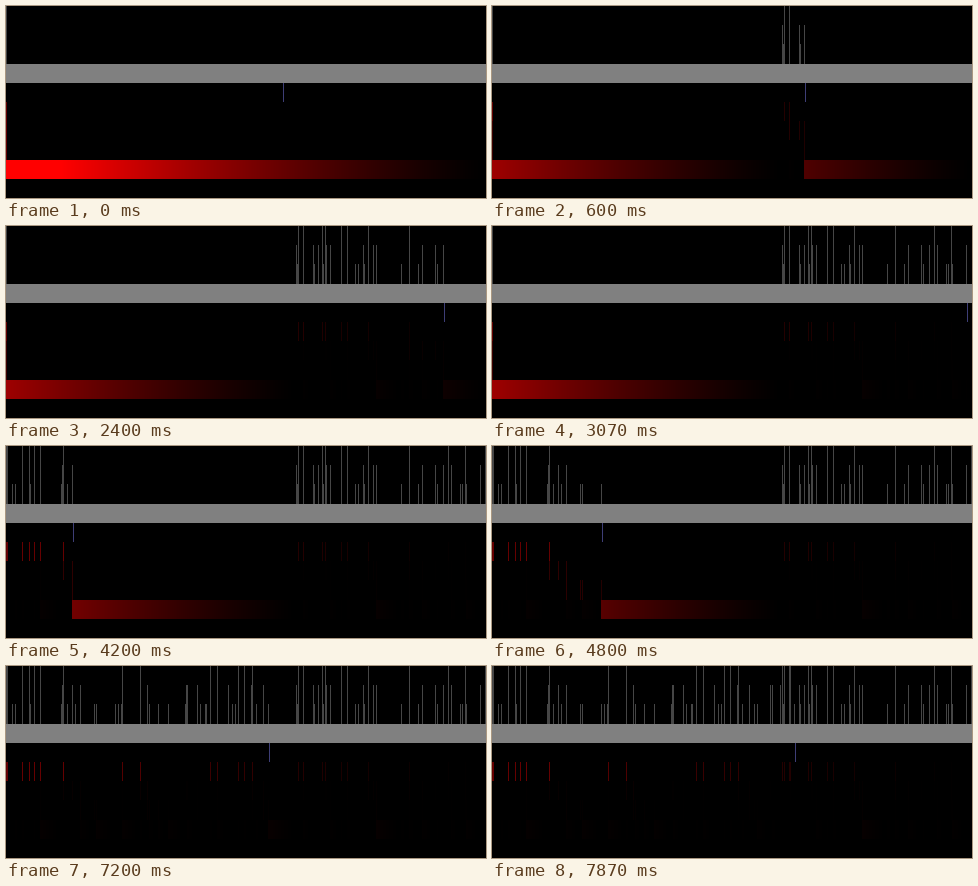
Recreate the animation shown at these times as a matplotlib script. Size 480 px wide and 192 px high, loop 8000 ms.

```python
import math
import random

import numpy as np
import matplotlib.pyplot as plt
from matplotlib.animation import FuncAnimation

W, H, DPI = 480, 192, 100
STEPS = 14
STEP_TICKS = 3          # three 200 ms ticks per cursor step
ROW = H / 10

GRAY, TICK, BLUE = (128,) * 3, (70,) * 3, (62, 62, 118)
FULL_REACH = 425        # distance that gives full red
LINE_DIM = 0.4          # single-column lines are dimmer than open spans

# Key tall nodes along the sweep; positions past W wrap around.
TALL = [292, 297, 316, 319, 335, 341, 362, 403, 442, 459, 479, 481,
        496, 503, 508, 514, 537, 596, 614, 684, 691, 712, 718, 726, 770, 778]


def cursor_at(step):
    """Steady sweep with a slight wobble, not yet wrapped."""
    wobble = 4 * math.cos(2 * math.pi * (step - 4) / 5.5)
    return round(277.5 + 39.1 * step + wobble)


def make_nodes():
    """Tall key nodes, plus short random ones leading up to each stop."""
    rng = random.Random(11)
    nodes = {0: 3}
    for step in range(1, STEPS):
        start, stop = cursor_at(step - 1), cursor_at(step)
        places = rng.sample(range(start + 2, stop - 2), 4) + [stop - 1]
        nodes.update((x, rng.choice((1, 2))) for x in places)
    nodes.update((x, 3) for x in TALL)
    return nodes


NODES = make_nodes()


def heights_at(cursor):
    """Node height in every column once the cursor has got this far."""
    heights = np.zeros(W, int)
    for x, level in NODES.items():
        if x <= cursor:
            heights[x % W] = max(heights[x % W], level)
    return heights


def distance_to_next(mask):
    """Columns from each x to the next marked column on its right."""
    dist = np.empty(W)
    nearest = W
    for x in range(W - 1, -1, -1):
        dist[x] = nearest - x
        if mask[x]:
            nearest = x
    return dist


def band(index):
    return slice(round(index * ROW), round((index + 1) * ROW))


def render(cursor):
    img = np.zeros((H, W, 3), np.uint8)
    heights = heights_at(cursor)
    for row in range(3):
        img[band(row), heights >= 3 - row] = TICK
    img[band(3)] = GRAY
    img[band(4), cursor % W] = BLUE

    # Each red row shows how far a level reaches before the next taller node.
    for row, level in enumerate((3, 2, 1, 0)):
        reach = distance_to_next(heights > level) / FULL_REACH
        red = 255 * np.minimum(reach ** 1.25, 1) * (LINE_DIM if level else 1)
        img[band(5 + row), :, 0] = np.where(heights >= level, red, 0)
    return img


fig = plt.figure(figsize=(W / DPI, H / DPI), dpi=DPI, facecolor="black")
ax = fig.add_axes([0, 0, 1, 1])
ax.axis("off")
picture = ax.imshow(render(cursor_at(0)), interpolation="nearest", aspect="auto")


def draw(i):
    picture.set_data(render(cursor_at(i // STEP_TICKS)))
    return [picture]


anim = FuncAnimation(fig, draw, frames=40, interval=200, repeat=True,
                     repeat_delay=0)
plt.show()
```
